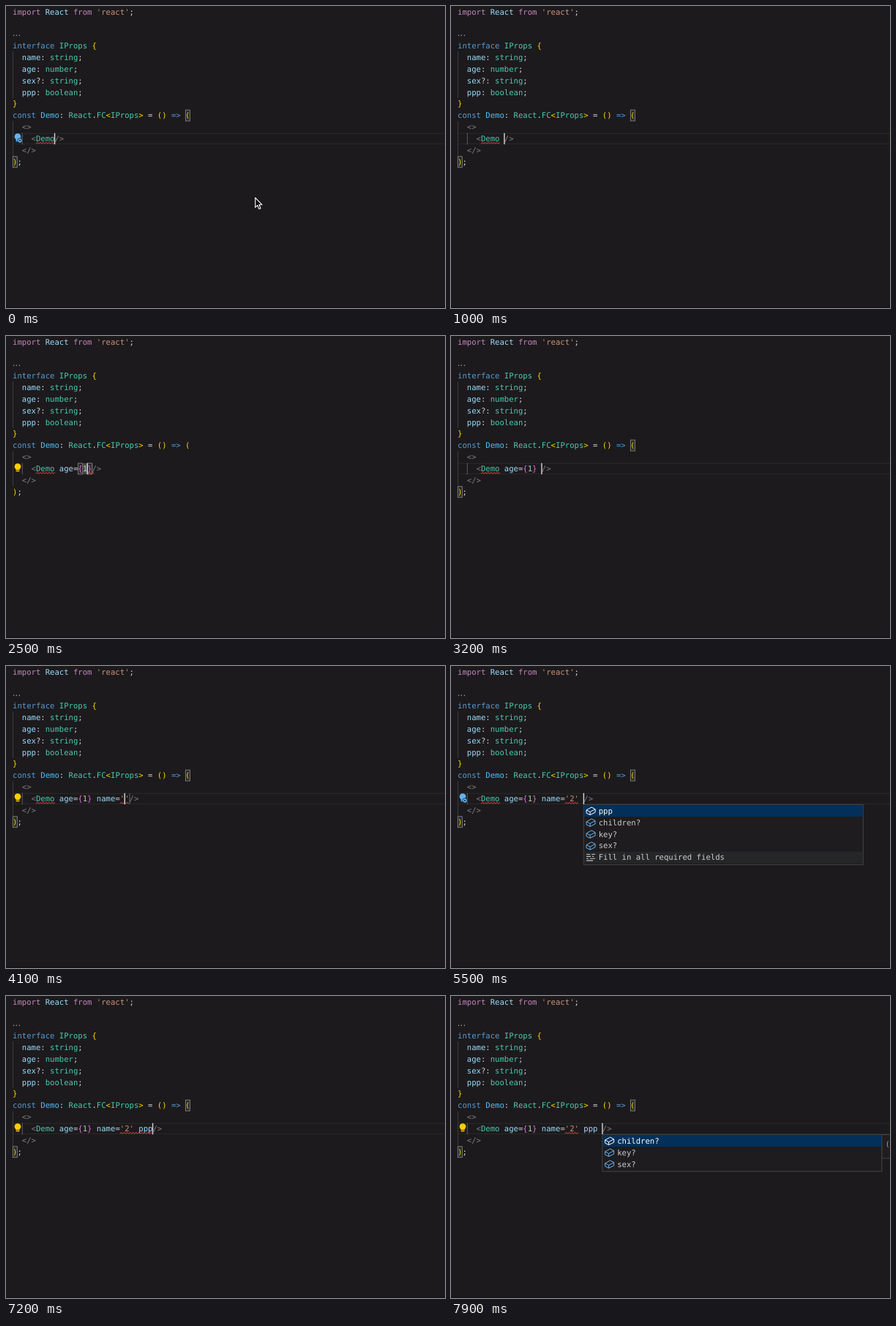
These frames come from a looping animation (600 by 413 pixels, 8 s). An HTML page:

```html
<!DOCTYPE html>
<html lang="en">
<head>
<meta charset="utf-8">
<title>Prop completion</title>
<style>
  html, body { margin: 0; width: 100%; height: 100%; overflow: hidden; background: #1c1a1c; }
  svg { display: block; width: 600px; height: 413px; }
  text {
    font: 10.6px "DejaVu Sans Mono", monospace;
    white-space: pre;
    text-rendering: geometricPrecision;
  }
</style>
</head>
<body>
<svg viewBox="0 0 600 413">
  <rect y="411.5" width="600" height="1.5" fill="#131113"/>
  <g id="back"></g>
  <g id="code"></g>
  <g id="live"></g>
  <rect id="caret" y="173.8" width="1.4" height="15.4" fill="#d8d8d8"/>
  <g id="popup"></g>
  <path id="mouse" d="M340.7 262.2V275.4L343.7 272.6L345.8 277.6L348 276.7L345.9 271.8H350Z"
        fill="#111" stroke="#fff" stroke-width="1.1" stroke-linejoin="round"/>
</svg>
<script>
const LOOP = 8000, LEFT = 9, CHAR = 6.381, LINE = 15.9;
const ROW = 10, BASE = 185.1, TOP = 173.5;
const C = {
  key: '#c586c0', blue: '#569cd6', name: '#9cdcfe', type: '#4ec9b0', str: '#ce9178',
  text: '#d4d4d4', gold: '#ffd700', pink: '#da70d6', num: '#b5cea8', tag: '#808080', decl: '#4fc1ff'
};
const $ = id => document.getElementById(id);
const colX = col => LEFT + col * CHAR;
const escape = s => s.replace(/&/g, '&amp;').replace(/</g, '&lt;');
const label = (x, y, s, fill) => `<text x="${x.toFixed(2)}" y="${y.toFixed(2)}" fill="${fill}">${escape(s)}</text>`;
const rect = (x, y, w, h, fill, extra = '') =>
  `<rect x="${x}" y="${y}" width="${w}" height="${h}" fill="${fill}" ${extra}/>`;

// Alternating list: text, colour key, text, colour key...
function codeLine(row, col, parts) {
  let out = '';
  for (let i = 0; i < parts.length; i += 2) {
    out += label(colX(col), BASE + (row - ROW) * LINE, parts[i], C[parts[i + 1]]);
    col += parts[i].length;
  }
  return out;
}

const field = (row, name, mark, type) =>
  codeLine(row, 2, [name, 'name', mark + ' ', 'text', type, 'type', ';', 'text']);

// Rows count from the top; the folded line sits a little higher.
$('code').innerHTML =
  codeLine(-0.87, 0, ['import ', 'key', 'React ', 'name', 'from ', 'key', "'react'", 'str', ';', 'text']) +
  '<text x="8.8" y="41.4" fill="#999" style="font:12px \'DejaVu Sans\',sans-serif">...</text>' +
  codeLine(2, 0, ['interface ', 'blue', 'IProps ', 'type', '{', 'gold']) +
  field(3, 'name', ':', 'string') +
  field(4, 'age', ':', 'number') +
  field(5, 'sex', '?:', 'string') +
  field(6, 'ppp', ':', 'boolean') +
  codeLine(7, 0, ['}', 'gold']) +
  codeLine(8, 0, ['const ', 'blue', 'Demo', 'decl', ': ', 'text', 'React', 'type', '.', 'text', 'FC', 'type',
    '<', 'gold', 'IProps', 'type', '>', 'gold', ' = ', 'text', '() ', 'gold', '=> ', 'blue', '(', 'gold']) +
  codeLine(9, 2, ['<>', 'tag']) +
  codeLine(11, 2, ['</>', 'tag']) +
  codeLine(12, 0, [')', 'gold', ';', 'text']) +
  rect(9, 62.2, 1, 63.6, '#3c3b3c') +
  rect(9, 157.6, 1, 47.7, '#3c3b3c') +
  rect(21.8, TOP, 1, LINE, '#5c5b5c');

const FILL = 'Fill in all required fields';
const ALL = ['age', 'name', 'ppp', 'children?', 'key?', 'sex?', FILL];
const AGE = ' age={1}', NAME = AGE + " name='2'";

// Each step changes only the values it lists; "edit" restarts the caret blink.
const steps = [
  { at: 0, edit: -400, attrs: '', caret: 0, bulb: 'blue', waves: [[5, 9]], match: 'outer',
    lit: true, list: null, details: '', stop: 0, mouse: true },
  { at: 500, edit: 500 },
  { at: 900, edit: 900, attrs: ' ', caret: 1, bulb: '', mouse: false },
  { at: 1100, list: ALL, bulb: 'yellow' },
  { at: 1400, details: 'age: number' },
  { at: 2000, edit: 2000, attrs: ' age={}', caret: 6, list: null, details: '', lit: false,
    match: [14, 15], bulb: '', stop: 16 },
  { at: 2400, edit: 2400, attrs: AGE, caret: 7, match: [14, 16], bulb: 'yellow',
    waves: [[5, 9], [16.2, 17.4]], stop: 17 },
  { at: 2900, edit: 2900, caret: 8, lit: true, stop: 0, waves: [[5, 9]] },
  { at: 3100, edit: 3100, attrs: AGE + ' ', caret: 9, match: 'outer', bulb: '' },
  { at: 3300, list: ALL.slice(1), bulb: 'yellow' },
  { at: 3500, details: 'name: string' },
  { at: 3900, edit: 3900, attrs: AGE + " name=''", caret: 15, list: null, details: '',
    waves: [[5, 9], [23, 25]], stop: 25 },
  { at: 4500, edit: 4500, attrs: NAME, caret: 16, waves: [[5, 9], [23, 26]], stop: 26 },
  { at: 4800, edit: 4800, caret: 17, stop: 0 },
  { at: 5100, edit: 5100, attrs: NAME + ' ', caret: 18, bulb: '' },
  { at: 5300, list: ALL.slice(2), bulb: 'blue' },
  { at: 5700, details: 'ppp: boolean', bulb: 'yellow' },
  { at: 6200, edit: 6200, attrs: NAME + ' ppp', caret: 21, list: null, details: '', bulb: '' },
  { at: 6600, waves: [[23, 30]], bulb: 'yellow' },
  { at: 7500, edit: 7500, attrs: NAME + ' ppp ', caret: 22, waves: [[23, 26]] },
  { at: 7700, list: ['children?', 'key?', 'sex?'] },
  { at: 7800, details: 'children?: React.ReactNode' }
];
let last = {};
const states = steps.map(step => last = { ...last, ...step });

function tagLine(attrs) {
  const parts = ['<', 'tag', 'Demo', 'type'];
  for (const s of attrs.match(/'[^']*'|[{}]|\d|=|\s+|\w+/g) || []) {
    const kind = s[0] === "'" ? 'str' : /[{}]/.test(s) ? 'pink' : /\d/.test(s) ? 'num' : s === '=' ? 'text' : 'name';
    parts.push(s, kind);
  }
  return codeLine(ROW, 4, [...parts, '/>', 'tag']);
}

function wave([from, to]) {
  let d = `M${colX(from)} 188.3`;
  for (let x = colX(from) + 2, up = true; x <= colX(to) + 0.5; x += 2, up = !up) d += `L${x} ${up ? 186.5 : 188.3}`;
  return `<path d="${d}" fill="none" stroke="#ee4a48" stroke-width="1"/>`;
}

function bulb(kind) {
  if (!kind) return '';
  const blue = kind === 'blue', fill = blue ? '#62b4f4' : '#ffcc00';
  const lamp = `<circle cx="16" cy="178.6" r="4.4" fill="${fill}"/>` +
    `<path d="M13.6 181H18.4V185.4H13.6Z" fill="${fill}"/>`;
  return lamp + (blue
    ? `<circle cx="19" cy="184" r="3.2" fill="${fill}" stroke="#1c1a1c" stroke-width=".8"/>` +
      '<circle cx="19" cy="184" r="1.1" fill="#1c1a1c"/>'
    : '<path d="M13.6 183.6H18.4" stroke="#1c1a1c" stroke-width=".7"/>');
}

function bracketBox(row, col) {
  return rect(colX(col) + 0.3, TOP + (row - ROW) * LINE + 0.5, CHAR - 0.4, LINE - 1,
    '#262a26', 'stroke="#858585" stroke-width=".9"');
}

function icon(x, y, item, active) {
  if (item === FILL) {
    return `<path transform="translate(${x} ${y})" d="M-6 -4.3H-1M1 -4.3H6M-6 -1.4H0M2 -1.4H4M-6 1.5H-3M-1 1.5H6M-6 4.4H3"
      fill="none" stroke="#c0c0c0" stroke-width="1.1"/>`;
  }
  return `<path transform="translate(${x} ${y})" d="M-6 -1.2L1 -5L6 -2.4V2L-1 5.4L-6 3ZM-6 -1.2L-1 1.4L6 -2.4M-1 1.4V5.4"
    fill="none" stroke="${active ? '#fff' : '#69b3f0'}" stroke-width="1" stroke-linejoin="round"/>`;
}

function popup({ list, details, caret }) {
  if (!list) return '';
  const x = colX(9 + caret), y = 190.2, width = 382;
  const frame = 'stroke="#454446" stroke-width="1"';
  let out = '';
  if (details) {
    out += rect(x + width, 189.6, 700, 32.4, '#1f1d1f', frame) +
      label(x + width + 4.8, 205.6, '(property) IProps.' + details, '#9d9d9d');
  }
  out += rect(x, 189.6, width, list.length * LINE + 2.6, '#1e1c1e', frame);
  list.forEach((item, i) => {
    const top = y + i * LINE, fill = i === 0 ? '#03305a' : i === 4 ? '#242628' : '';
    if (fill) out += rect(x + 0.5, top, width - 1, LINE, fill);
    out += icon(x + 9.8, top + LINE / 2, item, i === 0) +
      label(x + 20.4, top + 11.5, item, i === 0 ? '#fff' : '#cccccc');
  });
  return out;
}

function draw(s) {
  let back = '';
  if (s.lit) back += rect(9, 173.8, 600, 0.9, '#2c2b2c') + rect(9, 188.2, 600, 0.9, '#2c2b2c');
  if (s.match === 'outer') back += bracketBox(8, 37) + bracketBox(12, 0);
  else back += s.match.map(col => bracketBox(ROW, col)).join('');
  if (s.stop) {
    if (s.match !== 'outer') back += rect(colX(15), TOP + 0.5, (s.match[1] - 15) * CHAR, LINE - 1, '#474647');
    back += rect(colX(s.stop), TOP + 0.5, 0.9, LINE - 1, '#707070');
  }
  $('back').innerHTML = back;
  $('live').innerHTML = tagLine(s.attrs) + s.waves.map(wave).join('') + bulb(s.bulb);
  $('popup').innerHTML = popup(s);
  $('caret').setAttribute('x', colX(9 + s.caret) - 0.6);
  $('mouse').style.display = s.mouse ? '' : 'none';
}

let shown = null;
function tick() {
  const t = performance.now() % LOOP;
  const state = states.findLast(s => s.at <= t);
  if (state !== shown) draw(shown = state);
  const on = Math.floor((t - state.edit + 50) / 500) % 2 === 0;
  $('caret').style.opacity = on ? 1 : 0;
  requestAnimationFrame(tick);
}
tick();
</script>
</body>
</html>
```
